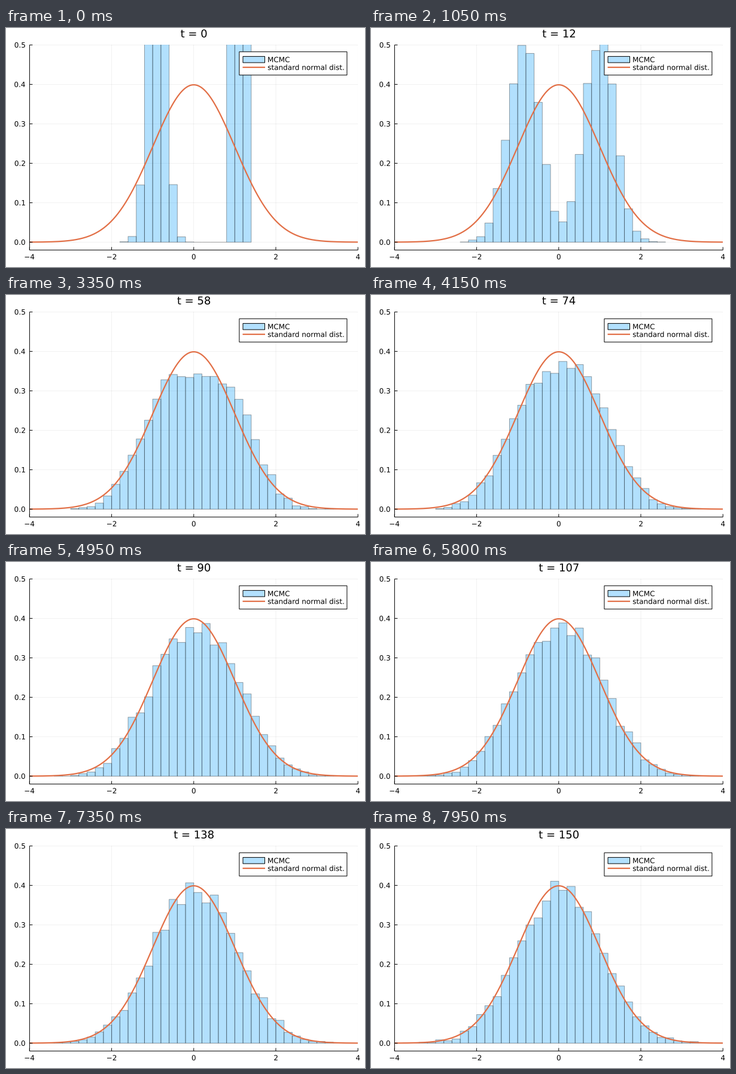
Write a matplotlib script that moves like this. It is 600x400 px and loops after 8 s.

```python
import numpy as np
import matplotlib.pyplot as plt
from matplotlib.animation import FuncAnimation
from matplotlib.collections import PolyCollection
from matplotlib.patches import PathPatch, Rectangle
from matplotlib.path import Path
from matplotlib.textpath import TextPath

W, H, DPI = 600, 400, 100
PX = 72 / DPI                       # one pixel in points
LEFT, RIGHT, TOP, BOTTOM = 39.37, 588.19, 28.35, 371.65
YMIN, YMAX = -0.02, 0.5
STEP_MS, HOLD, STEPS = 50, 10, 150
BIN = 0.2
EDGES = np.linspace(-5, 5, 51)
BLUE, PALE, ORANGE = "#009afa", "#b2e0fe", "#e26f46"

plt.rcParams["font.family"] = "DejaVu Sans"


def simulate(n=10000, rate=0.005):
    """Chains from two clusters relaxing towards the standard normal."""
    rng = np.random.default_rng(7)
    x = np.concatenate([
        np.clip(rng.normal(-0.9, 0.2, n // 2), -1.75, -0.05),
        rng.uniform(0.8, 1.32, n // 2),
    ])
    decay = np.exp(-rate)
    spread = np.sqrt(1 - decay ** 2)
    heights = []
    for _ in range(STEPS + 1):
        heights.append(np.histogram(x, EDGES)[0] / (n * BIN))
        x = decay * x + spread * rng.normal(size=n)
    return heights


def px(x):
    return LEFT + (x + 4) / 8 * (RIGHT - LEFT)


def py(y):
    return TOP + (YMAX - y) / (YMAX - YMIN) * (BOTTOM - TOP)


def stroke(xs, ys, color="black", width=1, **kw):
    page.plot(xs, ys, color=color, lw=width * PX, snap=False,
              solid_capstyle="butt", **kw)


def box(x0, y0, x1, y1, fill):
    page.add_patch(Rectangle((x0, y0), x1 - x0, y1 - y0, fc=fill, ec="black",
                             lw=PX, snap=False, zorder=4))


def text_path(x, y, s, size=12, align=0.0):
    """Glyph outlines; align is the share of the ink width left of x."""
    path = TextPath((0, 0), s, size=size)
    ink = path.get_extents()
    x -= align * (ink.x0 + ink.x1 if align == 0.5 else ink.x1)
    return Path(path.vertices * [1, -1] + [x, y], path.codes)


def label(*args, **kw):
    patch = PathPatch(text_path(*args, **kw), fc="black", lw=0, zorder=5)
    return page.add_patch(patch)


fig = plt.figure(figsize=(W / DPI, H / DPI), dpi=DPI, facecolor="white")

ax = fig.add_axes([LEFT / W, 1 - BOTTOM / H, (RIGHT - LEFT) / W, (BOTTOM - TOP) / H])
ax.set_xlim(-4, 4)
ax.set_ylim(YMIN, YMAX)
ax.axis("off")

page = fig.add_axes([0, 0, 1, 1])
page.set_xlim(0, W)
page.set_ylim(H, 0)
page.axis("off")

# Grid, axes and tick labels
grid = dict(color="black", alpha=0.1, lw=0.55 * PX, zorder=0, snap=False)
for v in range(-4, 5, 2):
    ax.plot([v, v], [YMIN, YMAX], **grid)
    stroke([px(v)] * 2, [BOTTOM, BOTTOM - 5])
    label(px(v), 387.2, str(v).replace("-", "\u2212"), align=0.5)
for v in np.arange(6) / 10:
    ax.plot([-4, 4], [v, v], **grid)
    stroke([LEFT, LEFT + 5], [py(v)] * 2)
    label(31.8, py(v) + 4.4, f"{v:.1f}", align=1)
stroke([LEFT, RIGHT], [BOTTOM] * 2)
stroke([LEFT] * 2, [TOP, BOTTOM])

# Histogram and density
bars = PolyCollection([], facecolor=(0, 154 / 255, 250 / 255, 0.3),
                      edgecolor=(0, 0, 0, 0.35), linewidths=PX, zorder=2)
bars.set_snap(False)
ax.add_collection(bars, autolim=False)
xs = np.linspace(-4, 4, 401)
ax.plot(xs, np.exp(-xs ** 2 / 2) / np.sqrt(2 * np.pi), color=ORANGE,
        lw=2.2 * PX, zorder=3)

# Legend, inset by a thirtieth of the plot area
right = RIGHT - (RIGHT - LEFT) / 30
top = TOP + (BOTTOM - TOP) / 30
row = 13
box(right - 180, top, right, top + 3 * row, "white")
box(396, top + row - 5.2, 432.5, top + row + 5.2, PALE)
stroke([395.5, 433], [top + 2 * row] * 2, ORANGE, 2.2, zorder=5)
label(437, top + row + 4.4, "MCMC")
label(437.2, top + 2 * row + 4.4, "standard normal dist.")

TITLE = dict(size=18, align=0.5)
middle = (LEFT + RIGHT) / 2
title = label(middle, 15.7, "t = 0", **TITLE)
heights = simulate()


def draw(frame):
    t = max(0, frame - HOLD + 1)
    used = np.flatnonzero(heights[t])
    verts = []
    for i in range(used[0], used[-1] + 1):
        a, b, h = EDGES[i], EDGES[i + 1], heights[t][i]
        verts.append([(a, 0), (b, 0), (b, h), (a, h)])
    bars.set_verts(verts)
    title.set_path(text_path(middle, 15.7, f"t = {t}", **TITLE))
    return bars, title


anim = FuncAnimation(fig, draw, frames=HOLD + STEPS, interval=STEP_MS,
                     repeat=True, repeat_delay=0, blit=False)
plt.show()
```
